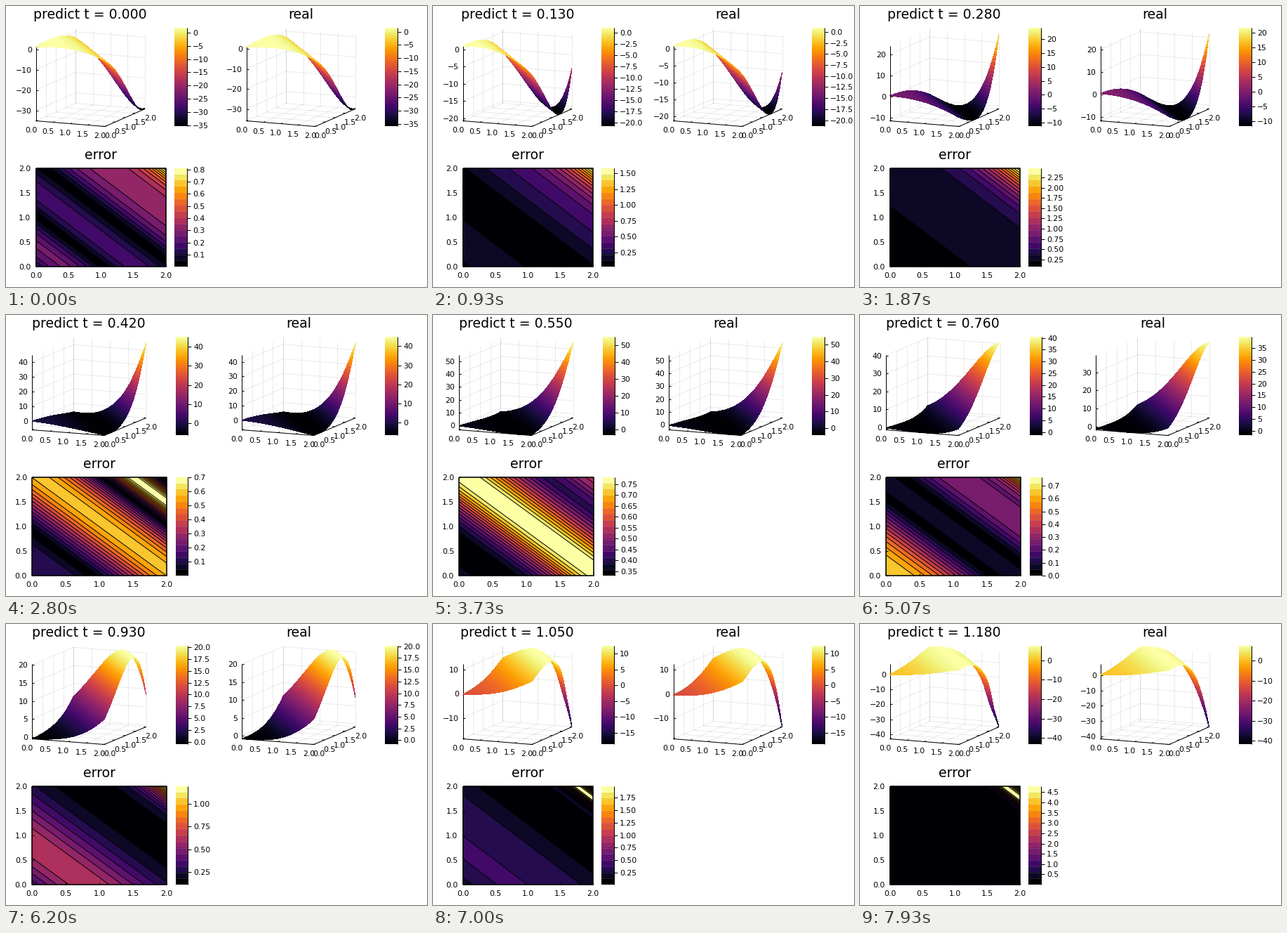
Animation, 600 px wide and 400 px high, one loop 8000 ms. Source, as a matplotlib script:

```python
import numpy as np
import matplotlib.pyplot as plt
from matplotlib.animation import FuncAnimation
from matplotlib.collections import LineCollection, PolyCollection

FRAMES, LOOP = 120, 8000
PX = 0.72  # points per pixel at 100 dpi
CMAP = plt.get_cmap("inferno")
BANDS = 16

plt.rcParams["font.family"] = "DejaVu Sans"
fig = plt.figure(figsize=(6, 4), dpi=100, facecolor="white")
ax = fig.add_axes([0, 0, 1, 1])
ax.set_xlim(0, 600)
ax.set_ylim(400, 0)
ax.axis("off")

# Signed model error along s = x + y (steps of 0.25) at a few times
KEY_S = np.linspace(0, 4, 17)
KEY_T = np.array([0, 0.28, 0.42, 0.56, 0.76, 0.93, 1.19])
KEY_D = np.array([
    [.10, .22, .26, .17, .03, -.11, -.18, -.15, -.06, .06, .20, .29, .32, .33, .38, .53, .81],
    [.08, .09, .12, .16, .20, .231, .26, .29, .31, .32, .345, .368, .47, .71, 1.12, 1.70, 2.47],
    [-.10, -.115, -.11, -.06, .05, .19, .34, .48, .57, .57, .47, .31, .06, -.40, -.70, -.38, .20],
    [.43, .385, .365, .37, .41, .49, .60, .72, .79, .785, .70, .60, .52, .475, .52, .57, .575],
    [.67, .655, .60, .50, .36, .20, .05, -.06, -.08, 0, .12, .23, .28, .265, .24, .40, .766],
    [.33, .46, .57, .625, .62, .55, .45, .35, .26, .195, .15, .11, .13, .18, .30, .62, 1.195],
    [.05, .10, .15, .10, .10, .15, .20, .20, .10, .05, -.10, -.10, -.10, -.05, -.40, -5.0, -1.7],
])

N = 48
GX, GY = np.meshgrid(np.linspace(0, 2, N + 1), np.linspace(2, 0, N + 1))
EX, EY = np.meshgrid(np.linspace(0, 2, 81), np.linspace(0, 2, 81))
HALVES = np.arange(0, 2.01, 0.5)


def exact(s, t):
    return np.exp(s) * np.cos(s + 4 * t)


def deviation(s, t):
    """Cubic Hermite in s, linear in t."""
    v = np.array([np.interp(t, KEY_T, col) for col in KEY_D.T])
    m = np.gradient(v)
    f = np.clip(s, 0, 4) / 0.25
    i = np.minimum(f.astype(int), len(KEY_S) - 2)
    u = f - i
    return ((1 + 2 * u) * (1 - u) ** 2 * v[i] + u * (1 - u) ** 2 * m[i]
            + u * u * (3 - 2 * u) * v[i + 1] + u * u * (u - 1) * m[i + 1])


def ticks(lo, hi, fine=True):
    span = hi - lo
    base = 10.0 ** np.floor(np.log10(span))
    m = span / base
    if fine:
        step = base * (0.25 if m < 3 else 0.5 if m < 4.8 else 1)
    else:
        step = base * (0.5 if m < 3 else 1)
    first, last = np.ceil(lo / step - 1e-6), np.floor(hi / step + 1e-6)
    return np.arange(first, last + 1) * step, step


def fmt(v, step):
    digits = next(d for d in range(4) if abs(step * 10**d - round(step * 10**d)) < 1e-6)
    return f"{v + 0.0:.{digits}f}".replace("-", "\u2212")


def label(x, y, s, ha="center"):
    ax.text(x, y + 4, s, size=7.8, ha=ha, va="baseline")


def title(x, y, s):
    ax.text(x, y, s, size=13.6, ha="center", va="baseline")


def lines(segs, color="black", width=1.0, z=3, **kw):
    ax.add_collection(LineCollection(segs, colors=color, linewidths=width * PX,
                                     zorder=z, **kw), autolim=False)


def colorbar(x, w, top, lo, hi, bands=None):
    bottom = top + 140
    n = bands or 256
    ax.imshow(CMAP(np.linspace(1, 0, n))[:, None, :], extent=(x, x + w, bottom, top),
              aspect="auto", interpolation="nearest", zorder=2)
    if bands:
        ys = top + 140 * np.arange(1, bands) / bands
        lines([[(x, y), (x + w, y)] for y in ys], (0.85, 0.85, 0.85, 0.5), 0.7,
              linestyles=(0, (1, 1.5)))
    segs = [[(x + w, top), (x + w, bottom)]]
    vals, step = ticks(lo, hi)
    for v in vals:
        y = bottom - 140 * (v - lo) / (hi - lo)
        segs.append([(x + w, y), (x + w + 5, y)])
        label(x + w + 8, y, fmt(v, step), "left")
    lines(segs)


def surface(x0, x1, z, name, bar_x, bar_w):
    lo, hi = z.min(), z.max()
    run = 0.634 * (x1 - x0)
    rise = (x1 - x0) - run

    def proj(x, y, h):
        return np.stack([x0 + x / 2 * run + y / 2 * rise,
                         163.5 + 4 * x - 12.5 * y - 107 * h], -1)

    def seg(a, b):
        return [proj(*a), proj(*b)]

    vals, step = ticks(lo, hi, False)
    grid = []
    for g in HALVES:
        grid += [seg((g, 0, 0), (g, 2, 0)), seg((0, g, 0), (2, g, 0)),
                 seg((g, 2, 0), (g, 2, 1)), seg((0, g, 0), (0, g, 1))]
    axes = [seg((0, 0, 0), (0, 0, 1)), seg((0, 0, 0), (2, 0, 0)), seg((2, 0, 0), (2, 2, 0))]
    for v in vals:
        h = (v - lo) / (hi - lo)
        grid += [seg((0, 0, h), (0, 2, h)), seg((0, 2, h), (2, 2, h))]
        p = proj(0, 0, h)
        axes.append([p, p + (3, 0)])
        label(x0 - 5.5, p[1], fmt(v, step), "right")
    for g in HALVES:
        a, b = proj(g, 0, 0), proj(2, g, 0)
        axes += [seg((g, 0, 0), (g, 0.08, 0)), seg((2, g, 0), (1.94, g, 0))]
        label(a[0] - 7, a[1] + 12.5, f"{g:.1f}")
        label(b[0] + 7.5, b[1] + 12.5, f"{g:.1f}")
    lines(grid, (0, 0, 0, 0.1), 0.8, 1)
    lines(axes)

    p = proj(GX, GY, (z - lo) / (hi - lo))
    quads = np.stack([p[:-1, :-1], p[:-1, 1:], p[1:, 1:], p[1:, :-1]], 2).reshape(-1, 4, 2)
    mid = (z[:-1, :-1] + z[:-1, 1:] + z[1:, 1:] + z[1:, :-1]) / 4
    ax.add_collection(PolyCollection(quads, facecolors=CMAP((mid.ravel() - lo) / (hi - lo)),
                                     edgecolors="none", antialiased=False, zorder=4),
                      autolim=False)
    title((x0 + x1) / 2, 18, name)
    colorbar(bar_x, bar_w, 31, lo, hi)


def error_map(x0, x1, e, bar_x, bar_w):
    lo, hi = e.min(), e.max()
    top, bottom = 231, 371
    px = x0 + EX / 2 * (x1 - x0)
    py = bottom - EY / 2 * (bottom - top)
    levels = np.linspace(lo, hi, BANDS + 1)
    ax.contourf(px, py, e, levels=levels, colors=CMAP(np.linspace(0, 1, BANDS)), zorder=2)
    ax.contour(px, py, e, levels=levels[1:-1], colors="black", linewidths=PX, zorder=3)
    box = [(x0, top), (x1, top), (x1, bottom), (x0, bottom), (x0, top)]
    lines([box], width=1.6, z=4)
    marks = []
    for g in HALVES:
        x = x0 + g / 2 * (x1 - x0)
        y = bottom - g / 2 * (bottom - top)
        marks += [[(x, bottom), (x, bottom - 3)], [(x0, y), (x0 + 3, y)]]
        label(x, 383, f"{g:.1f}")
        label(x0 - 7, y, f"{g:.1f}", "right")
    lines(marks, z=4)
    title((x0 + x1) / 2, 218, "error")
    colorbar(bar_x, bar_w, top, lo, hi, BANDS)


def wide_labels(z):
    vals, _ = ticks(z.min(), z.max(), False)
    return vals[0] <= -9.9


def draw(k):
    for art in [*ax.collections, *ax.texts, *ax.images]:
        art.remove()
    t = k / 100
    s = GX + GY
    real = exact(s, t)
    pred = real + deviation(s, t)
    if wide_labels(pred):
        left, right, far, bar = 42.5, 198, 228, (240, 18)
    else:
        left, right, far, bar = 37, 199.5, 229, (241.5, 17.5)
    surface(left, right, pred, f"predict t = {t:.3f}", *bar)
    span = (342.5, 497.5) if wide_labels(real) else (336, 498)
    surface(*span, real, "real", 540, 18)
    error_map(left, far, np.abs(deviation(EX + EY, t)), *bar)
    return []


anim = FuncAnimation(fig, draw, frames=FRAMES, interval=LOOP / FRAMES,
                     init_func=lambda: [], repeat=True, repeat_delay=0)
plt.show()
```
